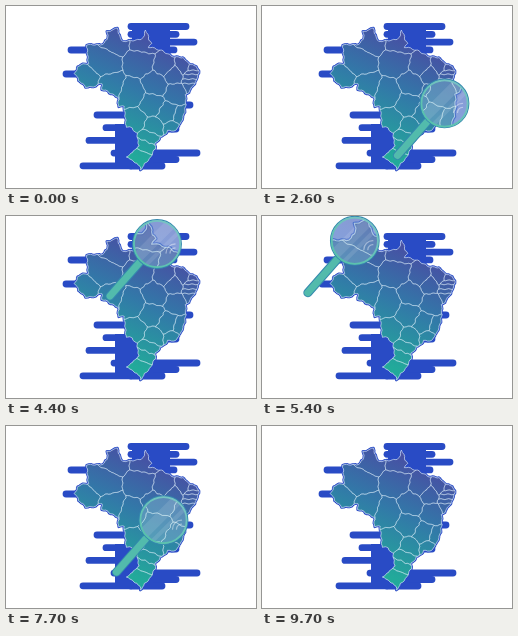
Write an HTML page with a canvas that moves like this. It is 250x182 px and loops after 9.8 s.

```html
<!DOCTYPE html>
<html lang="en">
<head>
<meta charset="utf-8">
<title>Map search</title>
<style>
html, body { margin: 0; width: 100%; height: 100%; overflow: hidden; background: #fff; }
canvas { display: block; width: 250px; height: 182px; }
</style>
</head>
<body>
<canvas id="stage"></canvas>
<script>
const W = 250, H = 182, LOOP = 9800, STEP = 100, SHOW_AT = 300, HIDE_AT = 9700;
const LENS_R = 24, ZOOM = 1.28, PIVOT = { x: 131, y: 90 };
const BLUE = '#294bc5';
const canvas = document.getElementById('stage');
const ctx = canvas.getContext('2d');
const ratio = window.devicePixelRatio || 1;
canvas.width = W * ratio;
canvas.height = H * ratio;

const points = text => text.split(' ').map(pair => {
  const [x, y] = pair.split(',').map(Number);
  return { x, y };
});
const mix = (a, b, u) => ({ x: a.x + (b.x - a.x) * u, y: a.y + (b.y - a.y) * u });

// Corners of the country; the small wiggles come from warp()
const corners = points('140,25 145,37 143,41 157,45 165,50 177,52 185,59 191,60 193,67 188,79 180,89 180,99 177,112 170,125 162,125 149,137 149,143 144,152 134,164 134,160 121,151 133,140 131,128 126,122 120,121 118,100 112,100 112,91 96,83 96,77 86,81 80,81 75,77 69,68 72,60 82,57 81,39 95,39 102,33 101,26 111,22 116,36 136,33');

// Regions grow around these centres; two even rows cover the small ones
const centres = points('80,75 98,56 109,34 104,81 126,88 130,115 135,56 138,36 150,78 160,60 168,68 178,60 171,87 146,99 162,108 174,112 168,122');
for (let i = 0; i < 5; i++) centres.push({ x: 186.5, y: 62 + i * 4.4 });
for (let i = 0; i < 4; i++) centres.push({ x: 135 + i * 4, y: 150 - i * 9.5 });

const warp = p => ({
  x: p.x + 0.5 * Math.sin(p.y * 0.9) + 0.3 * Math.sin(p.x * 1.7),
  y: p.y + 0.5 * Math.sin(p.x * 0.8) + 0.3 * Math.sin(p.y * 1.9)
});

function addShape(path, shape) {
  shape.forEach((a, i) => {
    const b = shape[(i + 1) % shape.length];
    const parts = Math.ceil(Math.hypot(b.x - a.x, b.y - a.y) / 2);
    for (let k = 0; k < parts; k++) {
      const p = warp(mix(a, b, k / parts));
      i + k ? path.lineTo(p.x, p.y) : path.moveTo(p.x, p.y);
    }
  });
  path.closePath();
}

// Keeps the part of a shape nearer to the centre than to its rival
function cutCloser(shape, centre, rival) {
  const middle = mix(centre, rival, 0.5);
  const side = p => (p.x - middle.x) * (rival.x - centre.x) + (p.y - middle.y) * (rival.y - centre.y);
  return shape.flatMap((a, i) => {
    const b = shape[(i + 1) % shape.length], sa = side(a), sb = side(b);
    const kept = sa <= 0 ? [a] : [];
    if (sa * sb < 0) kept.push(mix(a, b, sa / (sa - sb)));
    return kept;
  });
}

const country = new Path2D();
addShape(country, corners);
const regions = new Path2D();
for (const centre of centres) {
  let cell = points(`0,0 ${W},0 ${W},${H} 0,${H}`);
  for (const rival of centres) if (rival !== centre) cell = cutCloser(cell, centre, rival);
  addShape(regions, cell);
}

function gradient(x0, y0, x1, y1, ...colors) {
  const g = ctx.createLinearGradient(x0, y0, x1, y1);
  colors.forEach((c, i) => g.addColorStop(i / (colors.length - 1), c));
  return g;
}
const mapFill = gradient(170, 35, 118, 146, '#4a4aa3', '#3279a8', '#22aa9a');

function line(x0, y0, x1, y1, width, color) {
  ctx.lineCap = 'round';
  ctx.lineWidth = width;
  ctx.strokeStyle = color;
  ctx.beginPath();
  ctx.moveTo(x0, y0);
  ctx.lineTo(x1, y1);
  ctx.stroke();
}

// Evenly spaced bars from a common edge to each end
function drawBars(from, top, pitch, ends) {
  ends.forEach((end, i) => {
    const y = top + i * pitch, inset = 3 * Math.sign(from - end);
    line(from, y, end + inset, y, 6.8, BLUE);
  });
}

function drawBackground() {
  drawBars(125, 20.5, 7.8, [183, 173, 191, 171]);
  drawBars(100, 44, 24, [62, 57]);
  drawBars(125, 109, 12.7, [88, 97, 80, 105, 74]);
  drawBars(125, 99, 24, [187, 173, 194]);
  drawBars(125, 153.5, 6.5, [173, 159]);
  ctx.fillStyle = BLUE;
  ctx.fillRect(126, 20, 38, 28);
  ctx.fillRect(109, 118, 38, 42);
}

function drawMap() {
  ctx.lineJoin = 'round';
  ctx.lineWidth = 2.6;
  ctx.strokeStyle = BLUE;
  ctx.stroke(country);
  ctx.fillStyle = mapFill;
  ctx.fill(country);
  ctx.lineWidth = 0.8;
  ctx.strokeStyle = 'rgba(226,240,250,.8)';
  ctx.stroke(country);
  ctx.save();
  ctx.clip(country);
  ctx.lineWidth = 0.5;
  ctx.stroke(regions);
  ctx.restore();
}

// Lens centre, one stop per second
const stops = points('91,209 132,172 164,115 202,74 162,33 103,21 67,54 125,89 184,86 194,15 192,-50');

function lensAt(t) {
  const s = (t - 200) / 1000, i = Math.floor(s), u = s - i;
  const stop = k => stops[Math.min(Math.max(k, 0), stops.length - 1)];
  const [a, b, c, d] = [-1, 0, 1, 2].map(k => stop(i + k));
  const spline = k => b[k] + 0.5 * u * (c[k] - a[k] +
    u * (2 * a[k] - 5 * b[k] + 4 * c[k] - d[k] + u * (3 * (b[k] - c[k]) + d[k] - a[k])));
  return { x: spline('x'), y: spline('y') };
}

function circle(radius) {
  ctx.beginPath();
  ctx.arc(0, 0, radius, 0, Math.PI * 2);
}

function drawGlass(at) {
  ctx.save();
  circle(LENS_R);
  ctx.clip();
  ctx.fillStyle = gradient(10, -24, -10, 24, '#7c83d2', '#7890df');
  ctx.fillRect(-25, -25, 50, 50);

  ctx.save();
  ctx.translate(PIVOT.x - at.x, PIVOT.y - at.y);
  ctx.scale(ZOOM, ZOOM);
  ctx.translate(-PIVOT.x, -PIVOT.y);
  ctx.globalAlpha = 0.85;
  drawMap();
  ctx.restore();

  ctx.fillStyle = 'rgba(170,225,215,.24)';
  ctx.fillRect(-25, -25, 50, 50);
  ctx.strokeStyle = 'rgba(255,255,255,.4)';
  ctx.lineWidth = 1.3;
  for (const radius of [5, 9]) {
    ctx.beginPath();
    ctx.arc(18, 9, radius, Math.PI, Math.PI * 1.5);
    ctx.stroke();
  }
  ctx.rotate(-Math.PI / 4);
  ctx.fillStyle = 'rgba(255,255,255,.1)';
  ctx.fillRect(-30, -10, 60, 11);
  ctx.fillRect(-30, 5, 60, 4);
  ctx.restore();
}

function drawMagnifier(at) {
  ctx.save();
  ctx.translate(at.x, at.y);
  line(-18, 19, -47, 52, 9, '#3489ae');
  line(-18, 19, -47, 52, 7, '#52bbac');
  drawGlass(at);
  circle(LENS_R + 0.3);
  ctx.lineWidth = 1.2;
  ctx.strokeStyle = '#3489ae';
  ctx.stroke();
  circle(LENS_R - 0.9);
  ctx.lineWidth = 1.8;
  ctx.strokeStyle = gradient(15, -20, -15, 20, '#78c4c4', '#56c2aa');
  ctx.stroke();
  ctx.restore();
}

function render(now) {
  const t = Math.floor((now % LOOP) / STEP) * STEP;
  ctx.setTransform(ratio, 0, 0, ratio, 0, 0);
  ctx.fillStyle = '#fff';
  ctx.fillRect(0, 0, W, H);
  drawBackground();
  drawMap();
  if (t >= SHOW_AT && t < HIDE_AT) drawMagnifier(lensAt(t));
}

const start = performance.now();
function tick() {
  render(performance.now() - start);
  requestAnimationFrame(tick);
}
tick();
</script>
</body>
</html>
```
